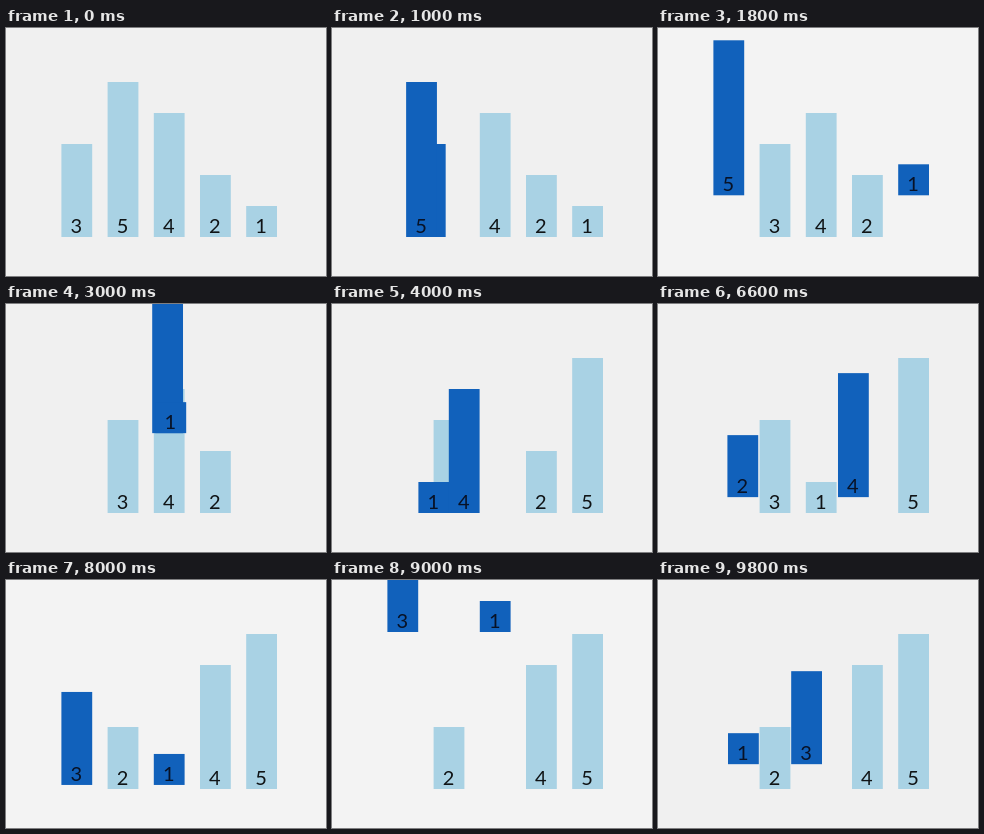
An HTML page with a canvas for the animation above (10 s loop, 320 px wide and 248 px high).

```html
<!DOCTYPE html>
<html lang="en">
<head>
<meta charset="utf-8">
<title>Heap sort</title>
<style>
  html, body { margin: 0; width: 100%; height: 100%; overflow: hidden; background: #f0f0f0; }
  canvas { display: block; width: 320px; height: 248px; }
</style>
</head>
<body>
<canvas id="stage" width="320" height="248"></canvas>
<script>
const ctx = document.getElementById('stage').getContext('2d');

const LOOP = 10000, TICK = 200, FIRST_HOLD = 400;
const LEFT = 55.4, PITCH = 46.2, WIDTH = 30.8, FLOOR = 209, UNIT = 31;
const RISE = 157, PHASE = 930, LEAD = 60;
const START = [3, 5, 4, 2, 1];

// Each swap exchanges slots a and b. With "fall" set, the bars rise
// straight up first and then descend diagonally to their new slots.
const SWAPS = [
  { a: 0, b: 1, start: 447 },
  { a: 0, b: 4, start: 1553, fall: 2543 },
  { a: 0, b: 2, start: 3688 },
  { a: 0, b: 3, start: 4794, fall: 5764 },
  { a: 0, b: 1, start: 6894 },
  { a: 0, b: 2, start: 7976, fall: 9017 }
];

const clamp = v => Math.min(1, Math.max(0, v));

function poseAt(t) {
  const order = START.slice();
  for (const { a, b, start, fall } of SWAPS) {
    const cross = fall || start;
    if (t < start - LEAD) break;
    if (t >= cross + PHASE) {
      [order[a], order[b]] = [order[b], order[a]];
      continue;
    }
    const shift = clamp((t - cross) / PHASE);
    const up = fall ? clamp((t - start) / PHASE) : 0;
    return { order, a, b, shift, lift: RISE * up * (1 - shift), rising: fall && shift === 0 };
  }
  return { order, a: -1, b: -1 };
}

function drawBar(value, slot, lift, active) {
  const x = LEFT + PITCH * slot, base = FLOOR - lift;
  ctx.fillStyle = active ? '#1161bb' : '#a9d2e4';
  ctx.fillRect(x, base - UNIT * value, WIDTH, UNIT * value);
  ctx.fillStyle = active ? '#081226' : '#101416';
  ctx.fillText(value, x + WIDTH / 2 - 0.5, base - 4);
}

function draw(t) {
  const { order, a, b, shift, lift, rising } = poseAt(t);
  ctx.fillStyle = rising ? '#f3f3f3' : '#f0f0f0';
  ctx.fillRect(0, 0, 320, 248);
  ctx.font = '20px Lato, "Open Sans", sans-serif';
  ctx.textAlign = 'center';
  order.forEach((value, i) => {
    if (i !== a && i !== b) drawBar(value, i, 0, false);
  });
  if (a < 0) return;
  const travel = (b - a) * shift;
  drawBar(order[a], a + travel, lift, true);
  drawBar(order[b], b - travel, lift, true);
}

const origin = performance.now();
function frame() {
  const t = Math.max(0, performance.now() - origin) % LOOP;
  draw(t < FIRST_HOLD ? 0 : Math.floor(t / TICK) * TICK);
  requestAnimationFrame(frame);
}
frame();
</script>
</body>
</html>
```
